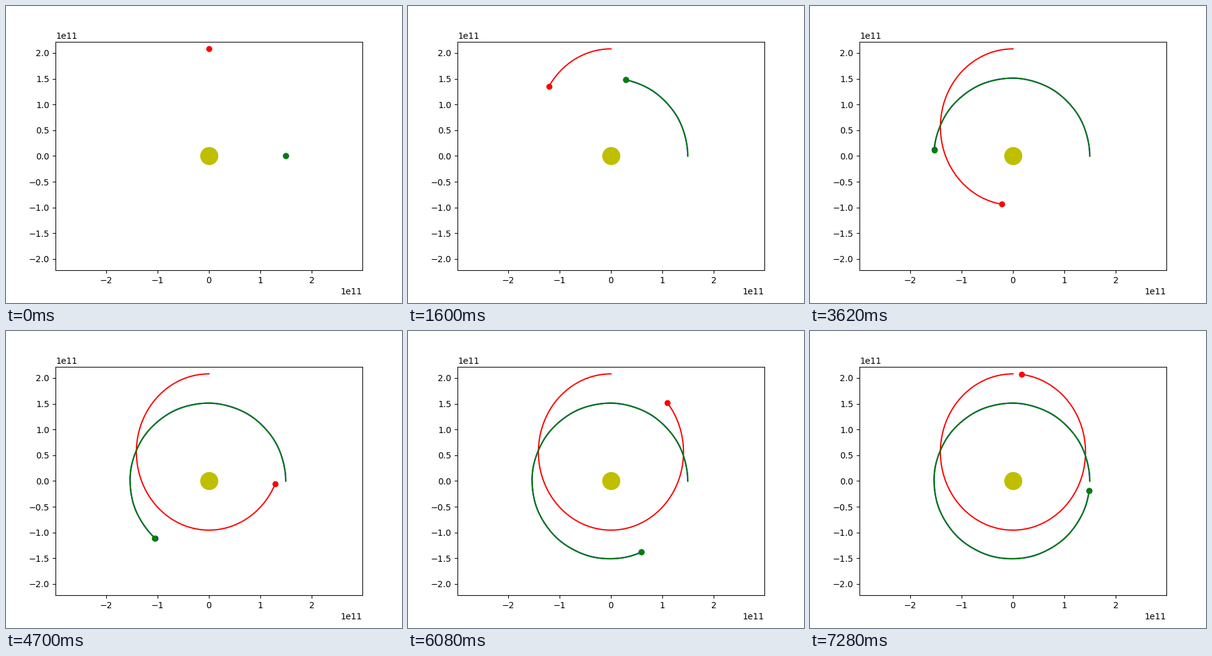
These frames come from a looping animation (640 px wide and 480 px high, 7300 ms). A matplotlib script:

```python
import numpy as np
import matplotlib.pyplot as plt
from matplotlib.animation import FuncAnimation

GM = 1.3225e20          # sun, m^3/s^2
AU = 1.49e11
DAY = 86400.0
DAYS = 365
SUB = 8                 # integration steps per day


def orbit(pos, vel):
    """Daily positions around the sun, velocity Verlet."""
    pos, vel = np.array(pos, float), np.array(vel, float)
    dt = DAY / SUB

    def pull(p):
        return -GM * p / np.hypot(*p) ** 3

    path = [pos.copy()]
    acc = pull(pos)
    for _ in range(DAYS - 1):
        for _ in range(SUB):
            vel += acc * dt / 2
            pos += vel * dt
            acc = pull(pos)
            vel += acc * dt / 2
        path.append(pos.copy())
    return np.array(path)


earth = orbit((AU, 0), (0, 30000))
rock = orbit((0, 2.08e11), (-20000, 0))
phase = 2 * np.pi * np.arange(DAYS) / 27.3
moon = earth + 3.84e8 * np.column_stack((np.cos(phase), np.sin(phase)))

fig, ax = plt.subplots(figsize=(6.4, 4.8), dpi=100)
half = 2 * AU
ax.set_xlim(-half, half)
ax.set_ylim(-half * 369.6 / 496, half * 369.6 / 496)

ax.plot(0, 0, "yo", markersize=20)
bodies = []
for path, color in ((earth, "b"), (rock, "r"), (moon, "g")):
    trail, = ax.plot([], [], color, lw=1.5)
    dot, = ax.plot([], [], color + "o", markersize=6)
    bodies.append((path, trail, dot))


def update(day):
    artists = []
    for path, trail, dot in bodies:
        trail.set_data(path[:day + 1, 0], path[:day + 1, 1])
        dot.set_data(path[day:day + 1, 0], path[day:day + 1, 1])
        artists += [trail, dot]
    return artists


anim = FuncAnimation(fig, update, frames=DAYS, interval=20, repeat=True,
                     repeat_delay=0, blit=False)
plt.show()
```
